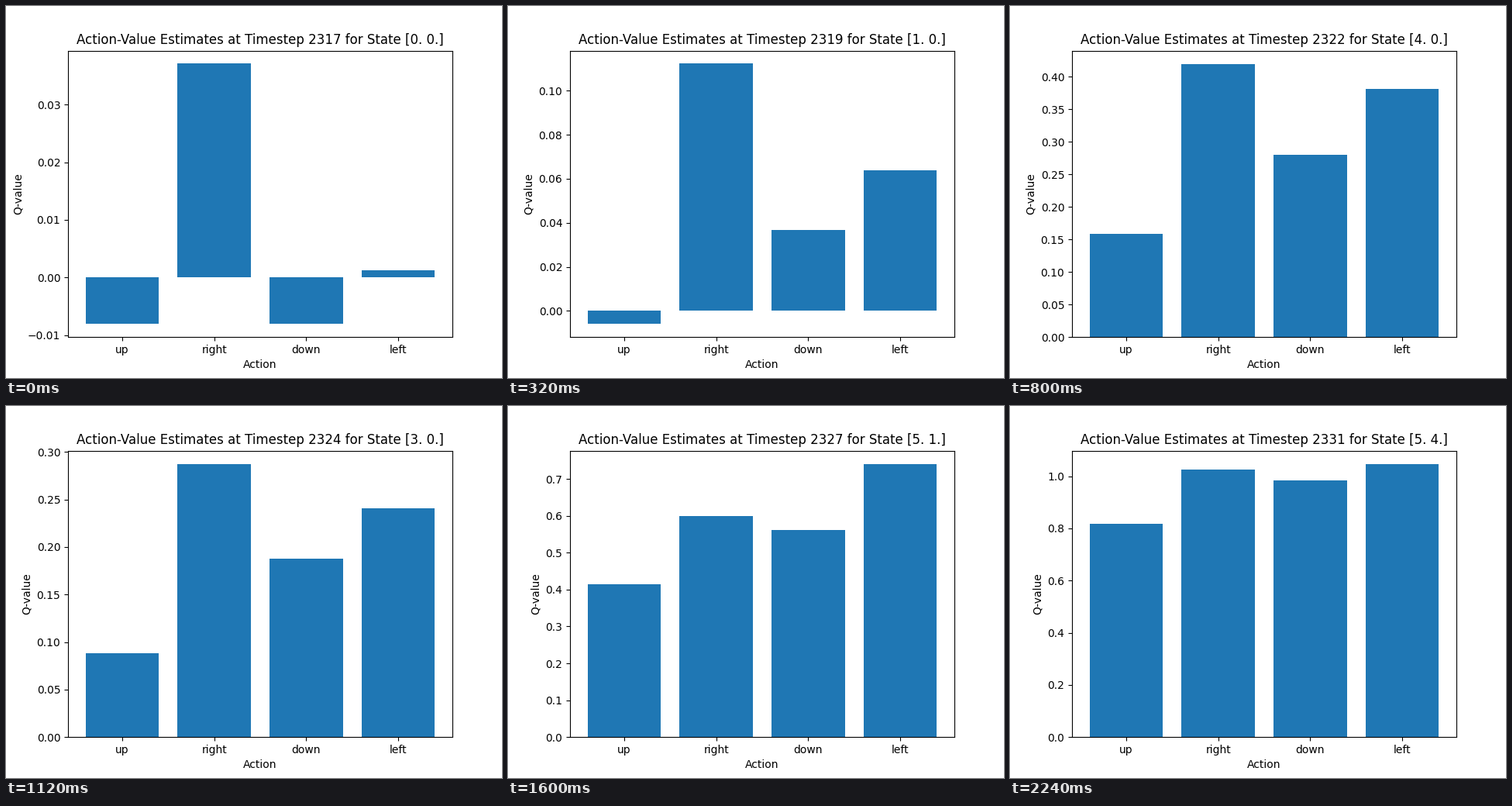
Animation of 640x480 px, one loop 2400 ms. Source, as a matplotlib script:

```python
from itertools import accumulate

import matplotlib.pyplot as plt
import numpy as np
from matplotlib.animation import FuncAnimation

ACTIONS = ["up", "right", "down", "left"]
FIRST_STEP = 2317
CORNER = 5        # the path runs right to this column, then along the other axis
STEP_COST = 0.04  # share of a cell's value spread lost by the action just tried

# Progress along the path: forward, slipped back or blocked.
PROGRESS = ".++++-.++++++."
TRIED = ["up"] + ["right"] * 8 + ["up"] * 4 + ["left"]

# Initial value curves along the path, linear between these cells.
KEY_CELLS = [0, 1, 2, 3, 4, 5, 8, 9]
CURVES = {
    "up": [-0.0081, -0.006, -0.0122, 0.088, 0.1586, 0.2525, 0.739, 0.817],
    "right": [0.0371, 0.1123, 0.145, 0.304, 0.419, 0.449, 0.899, 1.025],
    "down": [-0.008, 0.0367, 0.09, 0.188, 0.28, 0.432, 0.822, 0.983],
    "left": [0.0012, 0.0639, 0.125, 0.241, 0.381, 0.608, 1.004, 1.055],
}


def walk():
    """Return the visited path cells and the action values seen at each."""
    cells = list(accumulate(({"+": 1, "-": -1, ".": 0}[p] for p in PROGRESS),
                            initial=0))
    q = np.array([np.interp(range(max(cells) + 1), KEY_CELLS, CURVES[a])
                  for a in ACTIONS]).T
    seen = []
    for cell, action in zip(cells, TRIED + [None]):
        seen.append(q[cell].copy())
        if action:
            q[cell, ACTIONS.index(action)] -= STEP_COST * np.ptp(q[cell])
    return cells, seen


cells, history = walk()
fig, ax = plt.subplots(figsize=(6.4, 4.8), dpi=100)


def draw(i):
    x, y = min(cells[i], CORNER), max(cells[i] - CORNER, 0)
    ax.clear()
    ax.bar(ACTIONS, history[i], color="#1f77b4")
    ax.set_xlabel("Action")
    ax.set_ylabel("Q-value")
    ax.set_title(f"Action-Value Estimates at Timestep {FIRST_STEP + i} "
                 f"for State [{x}. {y}.]")


anim = FuncAnimation(fig, draw, frames=len(cells), init_func=lambda: draw(0),
                     interval=160, repeat=True, repeat_delay=0)
plt.show()
```
